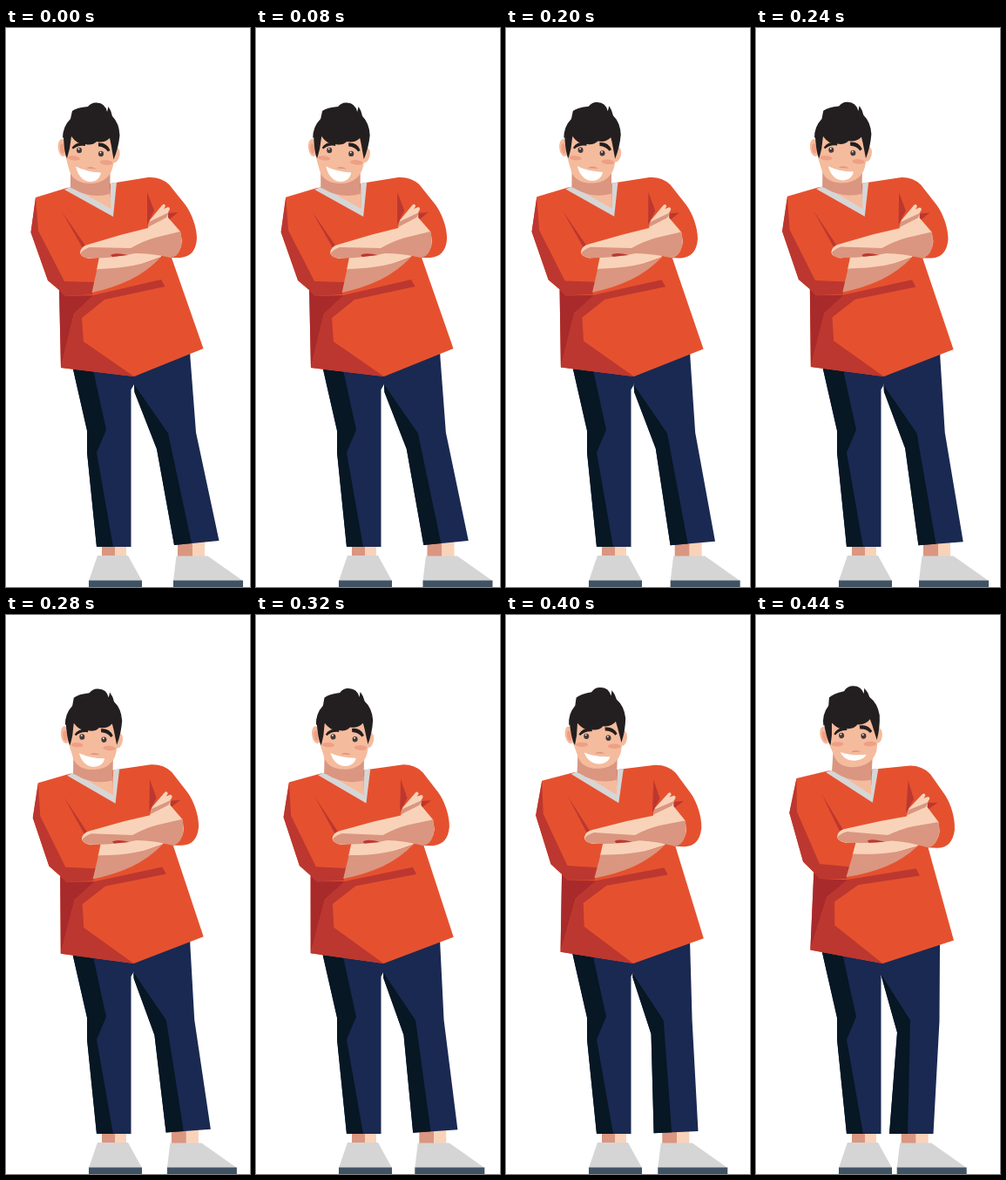
An HTML page with a canvas for the animation above (480 ms loop, 280 by 640 pixels).

```html
<!DOCTYPE html>
<html lang="en">
<head>
<meta charset="utf-8">
<title>Leaning man</title>
<style>
html, body { margin: 0; width: 100%; height: 100%; overflow: hidden; background: #fff; }
canvas { display: block; }
</style>
</head>
<body>
<canvas id="stage" width="280" height="640"></canvas>
<script>
const ctx = document.getElementById('stage').getContext('2d');
const LOOP = 480, STEP = 40;
// How far the man has straightened up at each step.
const PROGRESS = [0, 0.004, 0.017, 0.037, 0.067, 0.11, 0.165, 0.235, 0.32, 0.435, 0.585, 1];

const C = {
  shirt: '#e5512f', fold: '#bc372f', deep: '#a92a2b', collar: '#d6d6d6',
  skin: '#f9d3b9', shade: '#da9680', face: '#f5bb9d', blush: '#ee9f85',
  hair: '#231f20', eye: '#463a39', navy: '#1a2951', night: '#071723',
  shoe: '#d5d5d5', sole: '#3f5364', white: '#fff'
};

const lerp = (a, b, p) => a + (b - a) * p;

function fill(path, color) {
  ctx.fillStyle = color;
  ctx.fill(new Path2D(path));
}

function ellipse(x, y, rx, ry, color, angle = 0) {
  ctx.fillStyle = color;
  ctx.beginPath();
  ctx.ellipse(x, y, rx, ry, angle, 0, Math.PI * 2);
  ctx.fill();
}

// Each point is [x, y, endX, endY].
function morph(points, p, color) {
  ctx.beginPath();
  for (const [x, y, ex, ey] of points) ctx.lineTo(lerp(x, ex, p), lerp(y, ey, p));
  ctx.fillStyle = color;
  ctx.fill();
}

function group(x, y, px, py, angle, draw) {
  ctx.save();
  ctx.translate(px + x, py + y);
  ctx.rotate(angle);
  ctx.translate(-px, -py);
  draw();
  ctx.restore();
}

const CROTCH = [147, 408, 144, 412];
const THIGH_IN = [147.5, 417, 144, 414];
const HEM_IN = [193, 592, 153, 594];
const KNEE_IN = [173, 482, 162, 478];

function drawLegs(p) {
  const shift = -30.3 * p;
  fill('M110 590H125V606H110Z', C.shade);
  fill('M125 590H138V606H125Z', C.skin);
  fill('M105 604H140L156 633H95Z', C.shoe);
  fill('M95 632.500H156V640H95Z', C.sole);

  group(shift, 0, 0, 0, 0, () => {
    fill('M197 586H214V606H197Z', C.shade);
    fill('M214 586H228V606H214Z', C.skin);
    fill('M195.500 604.500H231.500L272 633H192Z', C.shoe);
    fill('M192 632.500H272V640H192Z', C.sole);
  });

  morph([
    [140, 380, 140, 380], [211, 366, 211, 370], [211.5, 378, 211, 379],
    [218, 463, 210.5, 465], [244.5, 587, 203.5, 594], HEM_IN, KNEE_IN, THIGH_IN, CROTCH
  ], p, C.navy);
  morph([CROTCH, [186, 464, 177, 464], [213, 590, 174, 594], HEM_IN, KNEE_IN, THIGH_IN], p, C.night);
  morph([
    [75, 382, 75, 382], [150, 375, 150, 375], CROTCH, [143.5, 414, 143.5, 414],
    [143.5, 594, 143.5, 594], [104, 594, 104, 594], [93, 486, 93, 486], [93, 461, 93, 461]
  ], p, C.navy);
  fill('M75 382H98L115 460L104 486L123 594H104L93 486V461Z', C.night);
}

function drawTorso() {
  fill('M34 194L70 183L120 178L163 171Q177 170 187 179L205.500 202C213 212 219 228 219 241' +
    'C218 255 212 262 200 263L190 263L226.500 367L147 399L63 389L61 300L48 289L28.500 234Z', C.shirt);

  fill('M34 194L28.500 234L48 289L61 300L68 307L99 305L102 291L67 290L37 232Z', C.fold);
  fill('M61 300L68 307L101 306L78 327L63 389Z', C.deep);
  fill('M100 306L178 288L182.500 296L113 311L87 332L89 359L147 399L63 389L78 327Z', C.fold);
  fill('M64 210L91 249L88 252Z', C.fold);
  fill('M162 188L170 209L162 225Z', C.fold);
  fill('M186 212L197.500 211L184 222L178 220Z', C.fold);

  // Neck and collar
  fill('M67 185L76 181L120 206V178L127 176.500L123 216Z', C.collar);
  fill('M76 182L119.500 185L120.500 207Z', C.face);
  fill('M74 158H119.500V190Q97 196 77 184L74 183Z', C.shade);

  // Lower arm
  fill('M108 257L104 277L140 276L178 262V257Z', C.skin);
  fill('M104.500 276Q150 275 178 262Q163 278 143 288Q122 298 98.500 303Z', C.shade);

  // Upper arm and hand
  fill('M85 257Q86 250 94 248L133 236.500L163 229L165 220L179 203Q182 200 183 204L181 207' +
    'L186 205Q190 206 186 211L186 217L200 233L202 244Q201 256 192 262L160 259L130 260L95 264Q85 262 85 257Z', C.skin);
  fill('M85.500 258Q88 254 96 251L143 252Q157 244 171 240L200 233Q203 244 200 253' +
    'Q197 262 189 263Q168 258 148 258Q121 264 95 263.500Q87 263 85.500 258Z', C.shade);
  fill('M163 228L164 222L187 211L184 217Z', C.shade);
  fill('M120 260Q125 256.500 140 260L122 262Z', C.fold);
}

function drawMouth(p) {
  const low = lerp(176, 170.500, p), mid = lerp(171, 167.500, p);
  fill(`M80 158.500Q93 165 109 165.500C108 ${mid + 1} 103 ${low} 97 ${low}C90 ${low} 83 ${mid} 80 158.500Z`, C.white);
}

function drawHead(p) {
  ellipse(65, 137, 5.3, 10, C.face, -0.1);
  ellipse(126, 146, 4.3, 8.5, C.face, 0.25);
  ellipse(64.5, 138, 2.5, 6, C.blush, -0.1);
  fill('M70 120L68 146L73 164C76 174 86 178 97 178C110 178 119 171 122 161L127 140L127 118Z', C.face);

  ellipse(78, 149, 7, 2.6, C.blush, 0.1);
  ellipse(115, 154, 7.3, 2.7, C.blush, 0.1);
  fill('M92 160.500Q97 157 104 161.500Q98 161 92 160.500Z', C.shade);
  drawMouth(p);

  for (const [x, y] of [[84, 140], [109, 144]]) {
    ellipse(x, y, 3, 3.2, C.eye);
    ellipse(x - 0.5, y - 1.5, 0.9, 0.9, C.white);
  }
  fill('M75.500 137Q80 130 91 131V135Q83 133.500 77 138.500Z', C.hair);
  fill('M106 131.500Q116 131 119.500 140L117 141.500Q113 136 106 135.500Z', C.hair);

  fill('M65 126Q65 113 74 104L76 95Q81 91 94 90Q98 85 104 85.500Q114 86 116 96L117.500 90Q121 95 122 101' +
    'Q130 109 130.500 123Q129 138 123.500 150.500L120.500 133L119 126Q113 132 104 130Q99 135 91 133Q82 134 75 124' +
    'L73 138L70 149Q67 145 66 125Z', C.hair);
}

function drawMan(p) {
  ctx.fillStyle = C.white;
  ctx.fillRect(0, 0, 280, 640);
  drawLegs(p);
  group(-1.5 * p, 0, 147, 399, 0.067 * p, drawTorso);
  group(14.3 * p, -3.8 * p, 97, 142, -0.14 * p, () => drawHead(p));
}

function frame() {
  const step = Math.floor((performance.now() % LOOP) / STEP);
  drawMan(PROGRESS[step]);
  requestAnimationFrame(frame);
}
frame();
</script>
</body>
</html>
```
